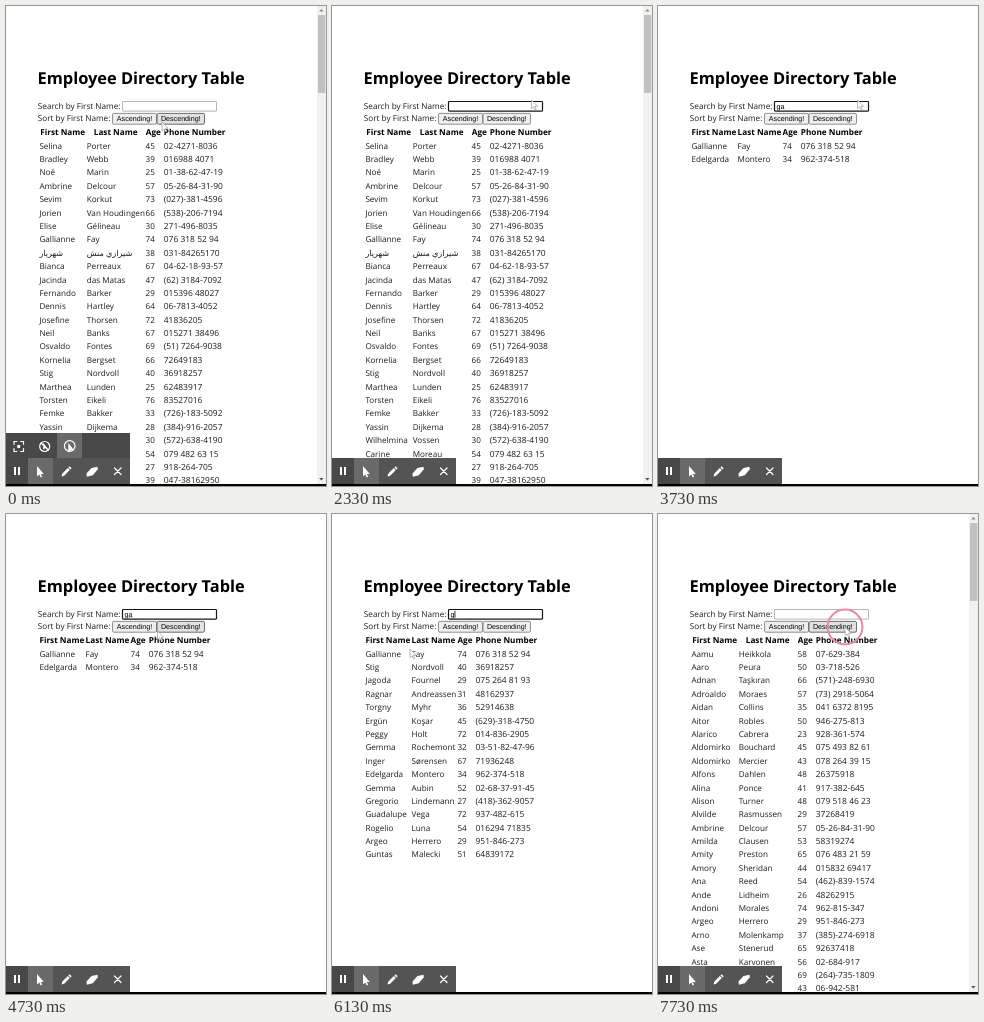
An HTML page for the animation above (8 s loop, 320x480 px).

```html
<!DOCTYPE html>
<html lang="en">
<head>
<meta charset="utf-8">
<title>Employee Directory Table</title>
<style>
  html, body { margin: 0; width: 100%; height: 100%; overflow: hidden; background: #fff; }
  svg { display: block; width: 100%; height: 100%; }
  text { font-family: "Open Sans", "Noto Sans", "DejaVu Sans", sans-serif; font-size: 8.15px; fill: #1c1c1c; text-rendering: geometricPrecision; }
  .title { font-size: 16.4px; font-weight: 700; fill: #000; }
  .label { font-size: 8.2px; }
  .head { font-size: 8.2px; font-weight: 700; fill: #000; }
  .phone { font-size: 8.45px; }
  .ui { font-family: "Liberation Sans", Arial, sans-serif; font-size: 7.15px; fill: #000; }
  .icon { fill: none; stroke: #fff; stroke-width: 1.2; stroke-linecap: round; }
  .solid { fill: #fff; }
</style>
</head>
<body>
<svg id="stage" viewBox="0 0 320 480" xmlns="http://www.w3.org/2000/svg">
  <rect width="320" height="480" fill="#fff"/>
  <text class="title" x="31.5" y="78">Employee Directory Table</text>
  <text class="label" x="31.8" y="102.8">Search by First Name:</text>
  <text class="label" x="31.8" y="115.2">Sort by First Name:</text>
  <rect id="field" x="116.5" y="95.5" width="94" height="9.6" fill="#fff"/>
  <text id="query" class="ui" x="118.6" y="102.6"></text>
  <path id="squiggle" d="M118.6 103.9l1 -.7l1 .7l1 -.7l1 .7l1 -.7l1 .7l1 -.7l1 .7" fill="none" stroke="#d9605a" stroke-width=".6"/>
  <path id="caret" stroke="#000" stroke-width=".8"/>
  <g id="buttons"></g>
  <g id="tables"></g>

  <g id="scrollbar">
    <rect x="311" width="9" height="478" fill="#f1f1f1"/>
    <rect x="312" y="9" width="7.3" height="78" fill="#c1c1c1"/>
    <path d="M313.2 5.6h4.4l-2.2 -2.6z" fill="#8a8a8a"/>
    <path d="M313.2 472h4.4l-2.2 2.6z" fill="#505050"/>
  </g>

  <rect y="478" width="320" height="2" fill="#000"/>

  <g id="popup">
    <rect y="427" width="124" height="25" fill="#484848"/>
    <rect x="51" y="427" width="25" height="25" fill="#6a6a6a"/>
    <path class="icon" d="M8 438.300v-2.800h2.800M14.700 435.500h2.800v2.800M17.500 442.700v2.800h-2.800M10.800 445.500h-2.800v-2.800"/>
    <circle class="solid" cx="12.700" cy="440.500" r="1.700"/>
    <circle class="icon" cx="38.700" cy="440.500" r="5"/>
    <path class="solid" d="M37.200 436.800v7l1.700 -1.600h2.600z"/>
    <path class="icon" d="M35.200 437l7 7"/>
    <circle class="icon" cx="63.700" cy="440" r="5.300"/>
    <path class="solid" d="M62.300 437v9.500l2.300 -2.200h3.400z"/>
  </g>

  <g id="toolbar">
    <rect y="452" width="124" height="26" fill="#545454"/>
    <rect y="452" width="22" height="26" fill="#484848"/>
    <rect x="22" y="452" width="25" height="26" fill="#6a6a6a"/>
    <path class="solid" d="M8 461h2v8h-2zM12 461h2v8h-2z"/>
    <path class="solid" d="M31 460v10.500l2.300 -2l1.500 3l1.400 -.7l-1.400 -2.900h3z"/>
    <path class="solid" d="M55.500 470.500l.7 -2.800l5.600 -5.600l2 2l-5.600 5.600zM62.500 461.400l1.100 -1.100l2 2l-1.100 1.100z"/>
    <path class="solid" d="M80.500 467.500l5 -5.500l6 -1.300l.3 2.500l-5 6l-6 1.500z"/>
    <path class="icon" d="M108.500 462l6.500 6.500M115 462l-6.500 6.500"/>
  </g>

  <path id="cursor" d="M0 0v8.600l2 -1.800l1.500 3l1.300 -.6l-1.400 -2.900h2.700z" fill="#fff" stroke="#8c8c8c" stroke-width=".6"/>
  <circle id="ring" r="17.4" fill="none" stroke-width="2"/>
</svg>

<script>
const NS = 'http://www.w3.org/2000/svg';
const $ = id => document.getElementById(id);

const everyone = `Selina|Porter|45|02-4271-8036
Bradley|Webb|39|016988 4071
Noé|Marin|25|01-38-62-47-19
Ambrine|Delcour|57|05-26-84-31-90
Sevim|Korkut|73|(027)-381-4596
Jorien|Van Houdingen|66|(538)-206-7194
Elise|Gélineau|30|271-496-8035
Gallianne|Fay|74|076 318 52 94
شهریار|شيرازي منش|38|031-84265170
Bianca|Perreaux|67|04-62-18-93-57
Jacinda|das Matas|47|(62) 3184-7092
Fernando|Barker|29|015396 48027
Dennis|Hartley|64|06-7813-4052
Josefine|Thorsen|72|41836205
Neil|Banks|67|015271 38496
Osvaldo|Fontes|69|(51) 7264-9038
Kornelia|Bergset|66|72649183
Stig|Nordvoll|40|36918257
Marthea|Lunden|25|62483917
Torsten|Eikeli|76|83527016
Femke|Bakker|33|(726)-183-5092
Yassin|Dijkema|28|(384)-916-2057
Wilhelmina|Vossen|30|(572)-638-4190
Carine|Moreau|54|079 482 63 15
||27|918-264-705
||39|047-38162950`;

const withG = `Gallianne|Fay|74|076 318 52 94
Stig|Nordvoll|40|36918257
Jagoda|Fournel|29|075 264 81 93
Ragnar|Andreassen|31|48162937
Torgny|Myhr|36|52914638
Ergün|Koşar|45|(629)-318-4750
Peggy|Holt|72|014-836-2905
Gemma|Rochemont|32|03-51-82-47-96
Inger|Sørensen|67|71936248
Edelgarda|Montero|34|962-374-518
Gemma|Aubin|52|02-68-37-91-45
Gregorio|Lindemann|27|(418)-362-9057
Guadalupe|Vega|72|937-482-615
Rogelio|Luna|54|016294 71835
Argeo|Herrero|29|951-846-273
Guntas|Malecki|51|64839172`;

const sorted = `Aamu|Heikkola|58|07-629-384
Aaro|Peura|50|03-718-526
Adnan|Taşkıran|66|(571)-248-6930
Adroaldo|Moraes|57|(73) 2918-5064
Aidan|Collins|35|041 6372 8195
Aitor|Robles|50|946-275-813
Alarico|Cabrera|23|928-361-574
Aldomirko|Bouchard|45|075 493 82 61
Aldomirko|Mercier|43|078 264 39 15
Alfons|Dahlen|48|26375918
Alina|Ponce|41|917-382-645
Alison|Turner|48|079 518 46 23
Alvilde|Rasmussen|29|37268419
Ambrine|Delcour|57|05-26-84-31-90
Amilda|Clausen|53|58319274
Amity|Preston|65|076 483 21 59
Amory|Sheridan|44|015832 69417
Ana|Reed|54|(462)-839-1574
Ande|Lidheim|26|48262915
Andoni|Morales|74|962-815-347
Argeo|Herrero|29|951-846-273
Arno|Molenkamp|37|(385)-274-6918
Ase|Stenerud|65|92637418
Asta|Karvonen|56|02-684-917
||69|(264)-735-1809
||43|06-942-581`;

function add(parent, tag, attrs, content) {
  const el = document.createElementNS(NS, tag);
  for (const key in attrs) el.setAttribute(key, attrs[key]);
  if (content) el.textContent = content;
  parent.appendChild(el);
  return el;
}

const parse = text => text.split('\n').map(line => line.split('|'));

function makeTable(rows, columns, headers) {
  const g = add($('tables'), 'g', {});
  ['First Name', 'Last Name', 'Age', 'Phone Number'].forEach((label, i) =>
    add(g, 'text', { class: 'head', x: headers[i], y: 129.2 }, label));
  rows.forEach((row, r) => row.forEach((cell, c) => {
    if (cell) add(g, 'text', { class: c === 3 ? 'phone' : '', x: columns[c], y: 142.6 + 13.39 * r }, cell);
  }));
  return g;
}

const wide = [33.4, 80.7, 139.6, 157.8], wideHead = [34.2, 87.8, 139.8, 157.8];
const mid = [33.4, 79.6, 125.4, 143.5], narrow = [33.4, 79.6, 124.6, 142.8];
const gRows = parse(withG);
const tables = {
  all: makeTable(parse(everyone), wide, wideHead),
  g: makeTable(gRows, mid, mid),
  ga: makeTable(gRows.filter(row => /ga/i.test(row[0])), narrow, narrow),
  sorted: makeTable(parse(sorted), wide, wideHead)
};

const buttons = [['Ascending!', 106.5, 44], ['Descending!', 151, 47.5]].map(([label, x, w]) => {
  const box = add($('buttons'), 'rect', { x, y: 107.4, width: w, height: 10.8, rx: 1.4, 'stroke-width': 0.8 });
  add($('buttons'), 'text', { class: 'ui', x: x + w / 2, y: 115.3, 'text-anchor': 'middle' }, label);
  return { box, x, w };
});

// Each track holds its value from the given time until the next entry.
const views = [[0, 'all'], [2530, 'g'], [2930, 'ga'], [5930, 'g'], [6530, 'all'], [7330, 'sorted']];
const pointer = [
  [0, 156, 116], [330, 178, 109], [730, 217, 96], [1130, 208, 96], [1530, 199.5, 94],
  [4130, 198, 99], [4330, 190, 107], [4530, 174, 113], [4730, 151.5, 117],
  [4930, 112, 128], [5130, 78, 135], [6530, 98, 122], [6930, 123.8, 109.7],
  [7330, 152, 112], [7730, 187, 113]
];

const at = (track, t) => track.filter(entry => entry[0] <= t).pop();
const show = (el, on) => el.setAttribute('display', on ? 'inline' : 'none');
const set = (el, attrs) => { for (const key in attrs) el.setAttribute(key, attrs[key]); };

function draw(t) {
  const view = at(views, t)[1];
  const [, x, y] = at(pointer, t);
  for (const key in tables) show(tables[key], key === view);
  const full = view === 'all' || view === 'sorted';
  show($('scrollbar'), full);
  show($('popup'), t < 330);

  const query = full ? '' : view;
  const focused = t >= 1530 && t < 6930;
  $('query').textContent = query;
  set($('field'), focused
    ? { stroke: '#14141e', 'stroke-width': 1.2, rx: 0.8 }
    : { stroke: '#a2a2a2', 'stroke-width': 0.8, rx: 0.5 });
  show($('squiggle'), view === 'ga' && t >= 4130);
  show($('caret'), query && (t - 2930) % 1060 < 530);
  set($('caret'), { d: `M${119 + 3.95 * query.length} 96.8v7` });

  for (const b of buttons) {
    const hover = y > 107 && y < 118.4 && x >= b.x && x < b.x + b.w;
    set(b.box, { fill: hover ? '#e2e2e2' : '#efefef', stroke: hover ? '#4c4c4c' : '#767676' });
  }

  set($('cursor'), { transform: `translate(${x} ${y})` });
  const first = t >= 6930 && t < 7330;
  show($('ring'), first || t >= 7730);
  set($('ring'), { cx: x, cy: y, stroke: first ? '#dd4a6a' : '#e88ba3' });
}

const start = performance.now();
function tick() {
  draw((performance.now() - start) % 8000);
  requestAnimationFrame(tick);
}
tick();
</script>
</body>
</html>
```
